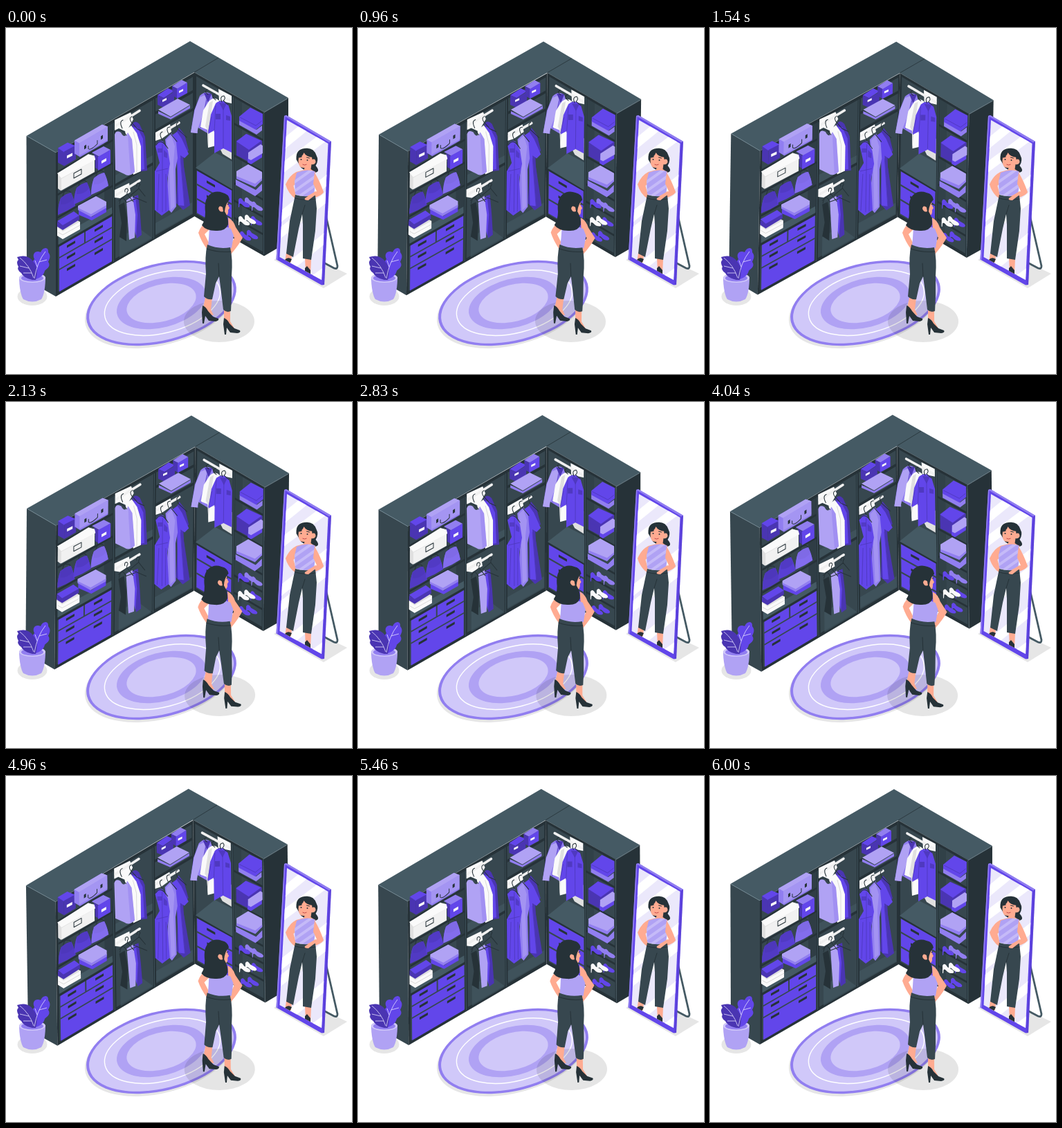
Write an HTML page that moves like this. It is 500 px wide and 500 px high and loops after 6.04 s.

```html
<!DOCTYPE html>
<html lang="en">
<head>
<meta charset="utf-8">
<title>Dressing room</title>
<style>
html, body { margin: 0; width: 100%; height: 100%; overflow: hidden; background: #fff; }
svg { display: block; width: 100%; height: 100%; }
.dark { fill: #263238; }
.slate { fill: #37474f; }
.steel { fill: #455a64; }
.violet { fill: #6246ea; }
.deep { fill: #4a35b2; }
.mid { fill: #917ef0; }
.light { fill: #b0a2f4; }
.pale { fill: #d0c8f9; }
.white { fill: #fafafa; }
.grey { fill: #e0e0e0; }
.skin { fill: #ffab91; }
.shade { fill: #e6e6e6; }
.line { fill: none; stroke: #263238; stroke-width: 1; stroke-linecap: round; stroke-linejoin: round; }
.fold { fill: none; stroke: #4a35b2; stroke-width: .7; }
.rod { fill: none; stroke: #f0f0f0; stroke-width: 3.6; stroke-linecap: round; }
</style>
</head>
<body>
<svg viewBox="0 0 500 500">
<defs>
  <clipPath id="glass"><path d="M406 133L465.500 167L456 364L395.500 331Z"/></clipPath>
  <clipPath id="topFront"><path d="M420 209Q433 203 446 207L448 219L445 241Q430 246 418 240L417 222Z"/></clipPath>
  <g id="bag">
    <path class="line" d="M7 9Q8 -2 13 0Q19 -2 19 6" stroke-width=".7"/>
    <path class="violet" d="M4 10Q12 3 19 2Q23 10 25 21Q13 29 0 34Q0 21 4 10Z"/>
    <path class="deep" d="M4 10Q12 3 19 2L22 11Q14 20 4 19Z" opacity=".45"/>
  </g>
  <path id="shoe" d="M0 2C2 -2 5 0 7 4L14 8Q18 11 15 13Q9 14 5 9Q3 7 1.500 8L1 13H0Z"/>
  <g id="hanger" class="line"><path d="M0 0Q-1 -5 3 -5Q6 -3 3 0L3 3L-9 13M3 3L12 14"/></g>
</defs>

<!-- rug -->
<g transform="translate(224.500 397.500) rotate(-14.500)">
  <ellipse class="shade" rx="111" ry="57" transform="translate(-3 3)"/>
  <ellipse class="mid" rx="111" ry="57"/>
  <ellipse class="pale" rx="107" ry="53.500"/>
  <ellipse rx="85.500" ry="43.500" cx="1.500" fill="none" stroke="#fff" stroke-width="1.4"/>
  <ellipse class="light" rx="66" ry="35"/>
  <ellipse class="pale" rx="51.300" ry="26.700"/>
</g>

<g id="wardrobe">
  <path class="slate" d="M29.500 156L72 180V388L30 364Z"/>
  <path class="steel" d="M29.500 156L266 19L408 101L373 121.500L272 64L72 180Z"/>
  <path class="dark" d="M373 121.500L408 101V309L373 329.500Z"/>
  <path d="M272 64L307 43" stroke="#263238" stroke-width=".8"/>
  <path d="M31 156.500L72 180M373 122L407 102" fill="none" stroke="#78909c" stroke-width=".6"/>

  <!-- left wing shell, shelves and drawers -->
  <g transform="translate(72 180) skewY(-30)">
    <path class="dark" d="M0 0H200V208H0Z"/>
    <path class="slate" d="M3 5H82V203H3ZM86 5H140V203H86ZM144 5H198V203H144Z"/>
    <path class="dark" d="M70 5H82V130H70Z" opacity=".45"/>
    <path class="dark" d="M3 28H82V31H3ZM3 61H82V64H3ZM3 94H82V97H3ZM3 135H82V139H3ZM86 95H140V99H86ZM144 24H198V28H144ZM144 50H198V54H144Z"/>
    <path class="violet" d="M5 139H41V154H5ZM43 139H81V154H43ZM5 156H81V171H5ZM5 173H81V204H5Z"/>
    <path class="dark" d="M16 143.500H28V147H16ZM56 143.500H68V147H56ZM16 160H28V163.500H16ZM56 160H68V163.500H56ZM16 177H28V180.500H16ZM56 177H68V180.500H56Z"/>
    <path d="M83.500 5V206M141.500 5V206" stroke="#455a64" stroke-width=".8"/>
  </g>
  <path class="steel" d="M76 313L153 268.500V259L108 284L76 300Z"/>
  <path class="steel" d="M158 225L212 194V184L181 200L158 213ZM164 332L212 304L190 288L164 303Z" opacity=".6"/>
  <path class="steel" d="M216 298L269 268V252L216 282Z" opacity=".6"/>

  <!-- boxes, case and bags -->
  <g transform="translate(0 -2.500)">
    <path class="deep" d="M75 176L84 181V202L75 197Z"/>
    <path class="violet" d="M75 176L89 168L101 173L84 182Z"/>
    <path class="deep" d="M84 181L101 172V192L84 202Z"/>
    <path class="white" d="M88 187L96 183V187L88 191Z"/>
    <path class="mid" d="M99 165L139 142L147 145V166L107 189L99 184Z"/>
    <path class="light" d="M99 165L139 142L147 145L106 169Z"/>
    <path class="light" d="M106 169L147 145V164L106 187Z" opacity=".65"/>
    <path class="line" d="M119 173V177Q122 180 132 170V165"/>
    <path class="dark" d="M113 173L116 171V176L113 178ZM137 159L140 157V162L137 164Z"/>
  </g>
  <g transform="translate(0 -1)">
    <path class="grey" d="M75 211L119 183L128 186V209L79 236L75 233Z"/>
    <path class="white" d="M74 211L119 184L130 186V191L80 218Z"/>
    <path class="white" d="M80 219L128 192V209L80 236Z" opacity=".65"/>
    <path class="line" d="M98 211L109 205V212L98 218Z" stroke-width=".7"/>
    <path class="mid" d="M124 181L141 172L151 177L135 187Z"/>
    <path class="deep" d="M127 183L134 187V206L129 203V190Z"/>
    <path class="violet" d="M133 187L151 177V197L133 207Z"/>
    <path class="white" d="M138 193L145 189V193L138 197Z"/>
  </g>
  <use href="#bag" x="75" y="236"/>
  <path class="deep" d="M79 246Q87 239 94 238Q98 246 100 257Q88 265 75 270Q75 257 79 246Z" opacity=".7"/>
  <use href="#bag" x="98" y="221"/>
  <path class="deep" d="M102 231Q110 224 117 223Q121 231 123 242Q111 250 98 255Q98 242 102 231Z" opacity=".4"/>
  <use href="#bag" x="123" y="207"/>
  <path class="mid" d="M127 217Q135 210 142 209Q146 217 148 228Q136 236 123 241Q123 228 127 217Z" opacity=".7"/>

  <!-- folded clothes, left wing -->
  <path class="grey" d="M74 286L99 276L107 280V290L82 305L74 300Z"/>
  <path class="white" d="M74 288L82 294L107 280V291L82 305L74 300Z"/>
  <path d="M75 295L82 299L107 285" fill="none" stroke="#ccc" stroke-width=".7"/>
  <path class="deep" d="M74 280L82 284L106 271V277L82 292L74 287Z"/>
  <path class="violet" d="M74 279L98 265L106 271L82 285Z"/>
  <path class="violet" d="M105 263L124 273L145 259V266L124 278L105 270Z"/>
  <path class="light" d="M104 257L130 243L145 251V258L123 270L104 261Z"/>
  <path class="mid" d="M104 260L123 269L145 256V260L123 273L104 263Z"/>

  <!-- middle column -->
  <path class="white" d="M157 133L180 122L184 132L174 150L163 145L157 148ZM157 234L178 224L180 237L165 246L157 245Z"/>
  <path class="rod" d="M159 141L193 119.500M160 241L193 220.500"/>
  <path class="deep" d="M182 139Q187 132 193 139L201 157L204 206L188 208Z"/>
  <path class="violet" d="M181 143L190 144L198 160L200 204L190 206Z"/>
  <path class="white" d="M172 148L181 141L189 152L195 171V207L184 212L176 180Z"/>
  <path d="M184 150L189 169V209" fill="none" stroke="#ccc" stroke-width=".7"/>
  <path class="light" d="M157 154Q159 147 166 151Q171 161 176 151L182 161L186 208Q178 216 171 211L158 205Z"/>
  <path class="mid" d="M176 151L182 161L186 208L180 212L177 170Z" opacity=".5"/>
  <path class="line" d="M158 150Q165 143 174 155M168 145Q163 135 169 133M181 136L190 146L199 150M181 136Q177 130 182 128"/>
  <path class="deep" d="M184 244L191 241L194 270L196 299L189 304L184 278Z"/>
  <path class="violet" d="M182 246L187 243L190 270L188 301L185 290Z"/>
  <path class="light" d="M174 249L183 243L187 270L186 303L178 306L176 279Z"/>
  <path class="dark" d="M163 256L171 252L175 274L174 308L164 302L167 282Z"/>
  <use href="#hanger" x="172" y="237"/><use href="#hanger" x="189" y="229"/>
  <path class="line" d="M164 254Q167 239 174 252L187 247M184 244L203 252"/>

  <!-- last column -->
  <path class="violet" d="M219 97L234 87L243 91L228 101Z"/>
  <path class="deep" d="M219 97L228 101L243 92V107L228 115L219 111Z"/>
  <path class="white" d="M226 104L232 101V104L226 107Z"/>
  <path class="mid" d="M240 84L254 75L262 79L248 88Z"/>
  <path class="deep" d="M240 84L248 88V102L241 98Z"/>
  <path class="violet" d="M247 88L262 79V94L247 102Z"/>
  <path class="white" d="M250 91L256 88V91L250 94Z"/>
  <path class="mid" d="M220 120L238 129L266 112V116L238 132L220 124Z"/>
  <path class="light" d="M220 118L248 102L266 111L238 128Z"/>
  <path class="white" d="M216 151L237 139L239 150L225 160L216 163Z"/>
  <path class="rod" d="M218 156L250 137"/>
  <path class="deep" d="M243 157L250 144L258 154L264 177L256 182L257 200L266 256L256 263L246 253L249 195Z"/>
  <path class="violet" d="M240 155L247 150L254 160L264 182L258 188L252 184L258 257L249 256L247 190Z"/>
  <path class="fold" d="M252 188L258 260M255 190L264 255"/>
  <path class="mid" d="M230 161L239 152L246 165L248 188L245 204L246 258L239 267L231 258L235 200Z"/>
  <path class="light" d="M232 162L239 155L244 171L242 194L244 258L238 263L236 200Z" opacity=".6"/>
  <path class="violet" d="M216 171Q219 161 227 164L234 177L237 196L233 218L236 263L225 271L215 263V207L222 195Z"/>
  <path class="deep" d="M219 174H226V180H219ZM228 176L233 181V188L228 186Z" opacity=".65"/>
  <path class="fold" d="M226 168V266M217 207L234 203M221 211L219 264M231 211V265"/>
  <path class="line" d="M217 169Q224 158 234 174M226 162Q220 152 226 150M235 153Q230 143 237 143M237 152L247 164M248 145Q244 138 249 136M248 146L261 158"/>

  <!-- right wing shell -->
  <g transform="translate(272 64) skewY(29.6)">
    <path class="dark" d="M0 0H101V208H0Z"/>
    <path class="slate" d="M3 4H55V203H3ZM58 4H99V203H58Z"/>
    <path class="dark" d="M58 4H69V203H58Z" opacity=".3"/>
    <path class="dark" d="M58 40H99V43H58ZM58 86H99V89H58ZM58 126H99V129H58ZM58 151H99V154H58ZM58 176H99V179H58ZM3 137H55V140H3Z"/>
    <path class="violet" d="M4 140H54V158.500H4ZM4 161H54V179.500H4ZM4 182H54V201H4Z"/>
    <path class="dark" d="M18 146H30V149.500H18ZM18 167H30V170.500H18ZM18 188H30V191.500H18Z"/>
    <path d="M56.500 4V206M100.500 1V206" stroke="#455a64" stroke-width=".8"/>
  </g>
  <path class="steel" d="M274 202L302 180L327 193V233Z"/>
  <path class="grey" d="M307 170L326 158V190L313 182Z"/>
  <path class="white" d="M307 88L326 98V109L308 105Z"/>
  <path class="rod" d="M285 83L324 105"/>

  <!-- hanging jackets -->
  <path class="mid" d="M280 98Q289 89 297 96L302 111L291 152L276 143L277 152L267 151L272 119Z"/>
  <path class="light" d="M280 100L290 96L285 124L278 143L276 152L267 151L273 118Z"/>
  <path class="deep" d="M286 94L297 95L292 108Z"/>
  <path class="fold" d="M290 104L281 145"/>
  <path class="white" d="M293 106Q301 98 308 105L307 169L292 173L291 147L281 143L285 119Z"/>
  <path class="grey" d="M294 108L299 105L295 135L292 172L291 147L288 142Z"/>
  <path class="violet" d="M303 109Q312 101 321 110L326 127V180L314 174L301 181V148L292 153L296 125Z"/>
  <path class="deep" d="M308 108L319 109L314 119ZM303 124H310V132H303ZM318 126L324 128V134L318 133Z" opacity=".75"/>
  <path class="fold" d="M314 116V173M303 112L301 150M297 128L292 151"/>
  <path class="line" d="M292 96Q285 92 291 89M303 104Q295 98 302 95M312 107Q308 99 315 98Q318 102 314 105L321 111"/>

  <!-- folded clothes and shoes, right wing -->
  <path class="mid" d="M337 133L362 147L370 141V148L362 154L337 140Z"/>
  <path class="violet" d="M337 128L353 115L371 124V139L361 147L337 134Z"/>
  <path class="fold" d="M338 129L361 141L370 134"/>
  <path class="deep" d="M333 163L348 153L370 163V178L352 194L333 184Z"/>
  <path class="violet" d="M333 164L347 153L369 163L351 176Z"/>
  <path class="fold" d="M333 173L352 184"/>
  <path class="violet" d="M350 183L370 172V187L354 197L349 194Z"/>
  <path class="light" d="M350 180L368 168L371 170V181L354 191L350 189Z"/>
  <path class="mid" d="M332 219L361 234L370 225V235L360 243L332 227Z"/>
  <path class="light" d="M333 207L350 197L370 208V220L360 228L333 217Z"/>
  <path class="mid" d="M333 214L360 225L370 217V220L360 230L333 218Z"/>
  <g class="mid"><use href="#shoe" x="345" y="245"/><use href="#shoe" x="355" y="251"/></g>
  <g class="violet"><use href="#shoe" x="336" y="246"/><use href="#shoe" x="354" y="272"/></g>
  <g class="white"><use href="#shoe" x="336" y="272"/><use href="#shoe" x="345" y="270"/></g>
  <g class="violet"><use href="#shoe" x="338" y="294"/><use href="#shoe" x="348" y="292"/></g>
</g>

<!-- plant -->
<ellipse class="shade" cx="38" cy="388" rx="21.500" ry="13"/>
<path class="light" d="M19 360C19 375 22 388 25 392Q38 399 51 392C55 386 57 374 57 360Z"/>
<ellipse class="pale" cx="38" cy="361" rx="19" ry="7"/>
<ellipse class="mid" cx="38" cy="361.500" rx="16" ry="5"/>
<path class="violet" d="M38 363C32 350 36 340 41 334C37 326 43 321 50 324C53 316 62 316 61 324C66 330 62 335 61 338C66 345 57 349 56 351C54 359 48 361 43 363Z"/>
<path class="deep" d="M38 364Q25 361 22 354Q15 349 18 345Q14 338 18 335L16 331Q31 326 39 337Q48 347 43 364Z"/>
<path d="M41 362Q45 338 57 323M45 345L42 336M48 338L59 335M40 361Q34 343 20 332M33 347L20 344M37 354L25 354" fill="none" stroke="#e5e0ff" stroke-width=".8"/>

<!-- mirror -->
<path class="shade" d="M387 335L402 328L470 344L493 355L459 376Z"/>
<path d="M462 270L479 344Q479 349 474 347L459 339" fill="none" stroke="#455a64" stroke-width="2.800"/>
<path class="violet" d="M402 127L405 126L470 164L460 371L456 371.500L390.500 334.500Z"/>
<path class="mid" d="M402 127L405 126L470 164L467 165.500ZM402 127L403.500 128L392.500 335L390.500 334.500Z"/>
<path class="deep" d="M470 164L460 371L457 371.500L467 165.500Z" opacity=".3"/>
<g clip-path="url(#glass)">
  <path fill="#ebe8fb" d="M390 120H475V375H390Z"/>
  <path d="M385 181L455 124M385 213L475 146M385 282L475 211M385 305L475 235M385 365L475 292M430 375L475 342" stroke="#fff" stroke-width="13"/>
  <g transform="translate(1.500 0)">
    <path class="dark" d="M430 174Q443 172 447 184Q451 191 446 199Q454 208 444 209Q433 208 425 202L418 190Q417 175 430 174Z"/>
    <path class="skin" d="M422 182Q430 178 440 182L441 190Q446 188 446 194Q444 198 440 197L439 204Q443 207 446 208L440 221L418 224L414 228L418 243L417 247Q406 239 402.500 226Q408 213 418 208L429 205L430 202Q421 203 421 192Z"/>
    <path class="dark" d="M419 188Q420 176 430 177Q440 176 442 187Q432 186 429 180Q427 187 419 188Z"/>
    <circle class="dark" cx="425" cy="190" r="1"/><circle class="dark" cx="434" cy="191" r="1"/>
    <path class="line" d="M423 187L426 186M433 187L437 188" stroke-width=".8"/>
    <path d="M427 197Q430 199 433 197" fill="none" stroke="#c14b4b"/>
  </g>
  <path class="light" d="M420 209Q433 203 446 207L448 219L445 241Q430 246 418 240L417 222Z"/>
  <path clip-path="url(#topFront)" d="M405 231L449 200M408 242L452 211M420 246L456 221" fill="none" stroke="#c5baf8" stroke-width="4"/>
  <path class="skin" d="M446 209Q453 220 459 237Q457 243 434 249L431 245L449 236L444 225Z"/>
  <path class="skin" d="M405 325L413 328L412 338L407 341L403 338ZM432 332L441 334L440 355L433 355Z"/>
  <path class="slate" d="M418 241Q431 245 447 242L449 261L447 293L441 335L429 333L429 284L428 269L423 290L415 331L405 326L410 279Z"/>
  <path class="line" d="M418 246Q431 250 447 247M428 269L432 256" stroke-width=".6"/>
  <path class="dark" d="M403 335Q407 330 413 334L410 340L402 339ZM432 347L435 344L440 350V358L432 354Z"/>
  <path class="skin" d="M447 236L451 238L437 249Q430 249 432 246Z"/>
</g>

<g id="woman">
  <ellipse cx="308" cy="424" rx="51" ry="30" fill="#000" opacity=".1"/>
  <path class="skin" d="M288 389L298 390L296 407L300 415L290 414L285 405ZM315 406L324 407L324 424L330 434L321 432L315 423Z"/>
  <path class="violet" d="M290 409L303 420L301 423L291 420ZM322 428L333 437L331 440L322 436Z"/>
  <path class="dark" d="M284 401Q288 402 292 409L299 417L307 420Q308 423 303 424L293 423L288 416L286 427H284L283 411ZM315 419Q320 421 323 427L330 434L338 437Q340 440 334 441L324 440L319 433L318 443H316L314 428Z"/>
  <path class="skin" d="M292 278Q281 286 278 296Q282 308 290 319L295 318L293 310L287 298L295 290ZM321 274Q329 278 332 288L342 303Q337 313 325 327L320 328L321 321L330 303L322 294Z"/>
  <path class="light" d="M294 288Q310 282 325 290L329 300L326 318Q308 321 292 314L293 304Z"/>
  <path class="slate" d="M291 313Q307 320 324 317Q328 334 326 358L326 388L325 409Q319 412 314 407L311 382L308 359L303 369L298 392Q291 393 286 388L289 355Q287 329 291 313Z"/>
  <path class="line" d="M290 319Q307 325 325 323M308 359L307 340" stroke-width=".6"/>
  <path class="skin" d="M312 251L320 249Q320 256 323 260L321 263Q322 270 317 271L309 270L306 258Z"/>
  <path class="dark" d="M294 241Q302 234 313 238Q322 240 323 248Q317 254 316 265Q322 275 321 284Q317 294 303 293Q289 293 283 285Q288 278 288 266Q286 248 294 241Z"/>
  <path class="skin" d="M313 259Q308 255 307 261Q309 267 314 265Z"/>
  <path class="line" d="M320 255L322 254" stroke-width=".8"/>
</g>
</svg>
<script>
const LOOP = 6040;
const wardrobe = document.getElementById("wardrobe");
const woman = document.getElementById("woman");

// One degree each way, linear between the extremes.
function sway(time, period) {
  const phase = (time % period) / period;
  if (phase < 0.25) return 4 * phase;
  if (phase < 0.75) return 2 - 4 * phase;
  return 4 * phase - 4;
}

function rotate(node, angle, x, y) {
  node.setAttribute("transform", `rotate(${angle} ${x} ${y})`);
}

function draw(time) {
  rotate(wardrobe, sway(time, LOOP), 219, 203);
  rotate(woman, sway(time, LOOP / 2), 308, 345);
}

const start = performance.now();
function tick() {
  draw((performance.now() - start) % LOOP);
  requestAnimationFrame(tick);
}
draw(0);
requestAnimationFrame(tick);
</script>
</body>
</html>
```
